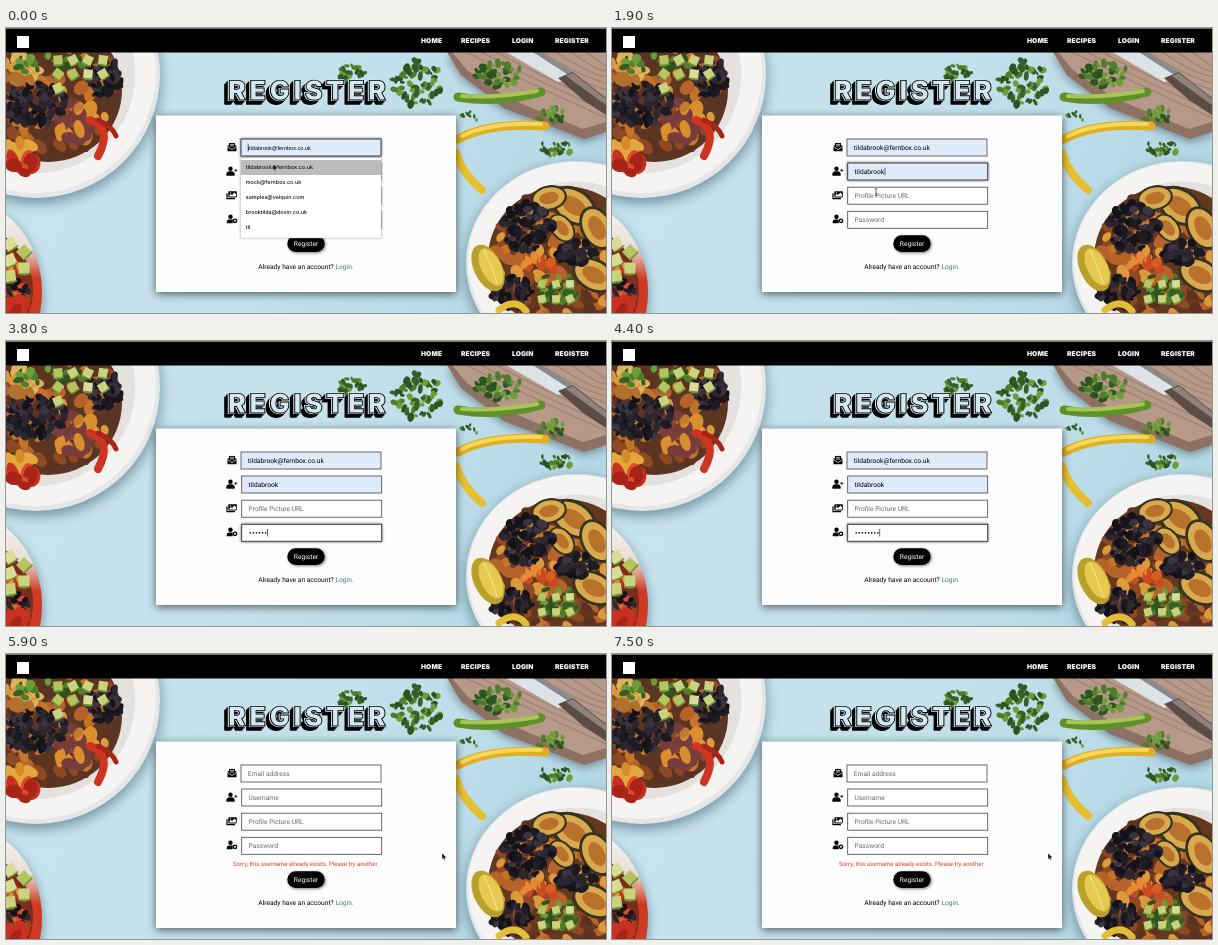
An HTML page with a canvas for the animation above (7600 ms loop, 600 px wide and 285 px high).

```html
<!DOCTYPE html>
<html lang="en">
<head>
<meta charset="utf-8">
<title>Register</title>
<style>
  html, body { margin: 0; width: 100%; height: 100%; overflow: hidden; background: #c4e0ea; }
  canvas, svg { position: absolute; left: 0; top: 0; width: 600px; height: 285px; }
  text { font: 6.67px Roboto, sans-serif; text-rendering: geometricPrecision; white-space: pre; }
  .nav text { font: 900 6.7px Inter, sans-serif; fill: #fff; letter-spacing: .1px; }
  .title text { font: 900 27px Inter, sans-serif; letter-spacing: 3.5px; stroke-linejoin: miter; }
  .card { fill: #fdfdfd; filter: drop-shadow(0 2px 4px rgba(0,0,0,.6)); }
  .field rect { fill: #fff; stroke: #444; stroke-width: .8; }
  .field text { fill: #6a6a6a; }
  .filled rect { fill: #e0ebfa; }
  .typed text { fill: #000; }
  .focus rect { stroke: #333; stroke-width: .9; filter: drop-shadow(0 .4px 1.5px rgba(0,0,0,.6)); }
  .preview text { font: 5.56px "Liberation Sans", Arial, sans-serif; }
  .panel { fill: #fff; stroke: #ccc; stroke-width: .4; filter: drop-shadow(0 .8px 1px rgba(0,0,0,.3)); }
  .list text { font: 500 5.42px Inter, sans-serif; fill: #111; }
  .pill { fill: #000; filter: drop-shadow(1px 1.5px 1.5px rgba(0,0,0,.5)); }
  .error { font-size: 6.04px; fill: #d8431c; }
</style>
</head>
<body>
<canvas id="photo" width="600" height="285"></canvas>
<svg id="ui" viewBox="0 0 600 285">
  <rect width="600" height="24.5"/>
  <rect width="600" height="1" fill="#777"/>
  <rect x="11" y="8" width="12" height="12" fill="#fff"/>
  <g class="nav">
    <text x="415" y="15">HOME</text>
    <text x="455" y="15">RECIPES</text>
    <text x="506" y="15">LOGIN</text>
    <text x="549" y="15">REGISTER</text>
  </g>
  <g class="title" id="title"></g>
  <rect class="card" id="card" x="150" y="87.5" width="300" height="176.5"/>
  <g id="icons">
    <path d="M221.5 118l4.5-3.6 4.5 3.6v5.2h-9zM223 115h6v2l-3 2-3-2z"/>
    <path d="M224 116.4h4M224 118h4M221.5 118.6l4.5 3 4.5-3" fill="none" stroke="#fff" stroke-width=".7"/>
    <circle cx="224.5" cy="140.8" r="2.2"/>
    <path d="M220.7 147.3v-1.2q0-2.4 2.4-2.4h2.8q2.4 0 2.4 2.4v1.2zM228.3 142.4h3M229.8 140.9v3" stroke="#000" stroke-width=".8"/>
    <path d="M221 165.3v5.4h8" fill="none" stroke="#000" stroke-width="1.2"/>
    <rect x="222.3" y="163.2" width="8.5" height="6.2" rx=".8"/>
    <path d="M223.3 168.5v-1l1.6-1.6 1.2 1.1 2.3-2.4 1.6 1.6v2.3z" fill="#fff"/>
    <circle cx="224.5" cy="164.9" r=".7" fill="#fff"/>
    <circle cx="224.5" cy="188.8" r="2.2"/>
    <path d="M220.7 195.2v-1.2q0-2.4 2.4-2.4h3.6v3.6z"/>
    <circle cx="229" cy="192.8" r="1.7" fill="#fff" stroke="#000" stroke-width="1.4"/>
  </g>
  <g id="fields"></g>
  <text class="error" id="error" x="227" y="211.6">Sorry, this username already exists. Please try another</text>
  <g id="foot">
    <rect class="pill" x="281.3" y="207.3" width="37.4" height="16.6" rx="8.3"/>
    <text x="287.8" y="217.5" fill="#fff">Register</text>
    <text x="252.3" y="241">Already have an account? <tspan fill="#3c7d74">Login.</tspan></text>
  </g>
  <g id="dots"></g>
  <rect id="caret" width=".6" height="7.6"/>
  <g class="list" id="emails"></g>
  <g class="list" id="users"></g>
  <path id="arrow" d="M0 0v6.6l1.5-1.4 1 2.4 1.1-.5-1-2.3h2.1z" stroke="#fff" stroke-width=".5"/>
  <path id="beam" d="M-1.3-3.4q1.3 0 1.3.8 0-.8 1.3-.8M0-2.6v5.2M-1.3 3.4q1.3 0 1.3-.8 0 .8 1.3.8" fill="none" stroke="#222" stroke-width=".7"/>
</svg>
<script>
const LOOP = 7600;
const USER = "tildabrook", EMAIL = USER + "@fernbox.co.uk";
const $ = id => document.getElementById(id);

function add(parent, tag, attrs, text) {
  const el = document.createElementNS($("ui").namespaceURI, tag);
  for (const key in attrs) el.setAttribute(key, attrs[key]);
  if (text) el.textContent = text;
  parent.appendChild(el);
  return el;
}
const show = (el, on) => el.style.display = on ? "" : "none";

// ---- background ----
const ctx = $("photo").getContext("2d");
let seed = 11;
const rnd = () => (seed = seed * 16807 % 2147483647) / 2147483647;
const pick = list => list[Math.floor(rnd() * list.length)];

function oval(x, y, rx, ry, color, turn = 0) {
  ctx.fillStyle = color;
  ctx.beginPath();
  ctx.ellipse(x, y, rx, ry, turn, 0, Math.PI * 2);
  ctx.fill();
}
function poly(color, ...pts) {
  ctx.fillStyle = color;
  ctx.beginPath();
  for (let i = 0; i < pts.length; i += 2) ctx.lineTo(pts[i], pts[i + 1]);
  ctx.fill();
}
function curve(color, width, x, y, cx, cy, ex, ey) {
  ctx.strokeStyle = color;
  ctx.lineWidth = width;
  ctx.lineCap = "round";
  ctx.beginPath();
  ctx.moveTo(x, y);
  ctx.quadraticCurveTo(cx, cy, ex, ey);
  ctx.stroke();
}
function scatter(n, x, y, rx, ry, size, colors) {
  for (let i = 0; i < n; i++) {
    const a = rnd() * 6.283, d = Math.sqrt(rnd()), s = size * (.6 + rnd() * .6);
    oval(x + Math.cos(a) * d * rx, y + Math.sin(a) * d * ry, s, s * (.45 + rnd() * .4), pick(colors), rnd() * 3);
  }
}
function shade(color, blur, y) {
  ctx.shadowColor = color;
  ctx.shadowBlur = blur;
  ctx.shadowOffsetY = y;
}
function plate(x, y, rx, ry) {
  shade("rgba(45,85,105,.6)", 14, 5);
  oval(x, y, rx, ry, "#e6e6e6");
  shade("transparent", 0, 0);
  oval(x - 1, y - 2, rx - 3, ry - 3, "#f5f4f3");
  oval(x, y, rx * .8, ry * .8, "#e4e1de");
}
function gradient(x0, y0, x1, y1, ...colors) {
  const g = ctx.createLinearGradient(x0, y0, x1, y1);
  colors.forEach((c, i) => g.addColorStop(i / (colors.length - 1), c));
  return g;
}
function courgette(x, y, r, turn) {
  oval(x, y, r, r * .7, "#33331f", turn);
  oval(x, y, r * .88, r * .58, "#d9a94e", turn);
  oval(x, y, r * .55, r * .33, "#b9722c", turn);
}
function avocado(x, y, r) {
  const a = rnd() * 1.5, c = Math.cos(a) * r, s = Math.sin(a) * r;
  poly(pick(["#c9d27c", "#b3c460", "#dadb95"]), x + c, y + s, x - s, y + c, x - c, y - s, x + s, y - c);
  curve("#6f9434", 1.6, x + c, y + s, x, y + r, x - s, y + c);
}

const WARM = ["#c47428", "#dc9a3c", "#8f4824", "#b5632a", "#5d3020"];
const BEANS = ["#1d1a22", "#2b2630", "#14131a", "#3a3340"];
const GREENS = ["#4f7d2c", "#6f9c3a", "#355f25", "#2d5420"];
const REDS = ["#c8301f", "#dd4a2b", "#a82318"];

function leftDishes() {
  plate(30, 46, 124, 124);
  oval(42, 62, 74, 72, "#5c3422");
  scatter(90, 42, 62, 68, 66, 8, WARM);
  scatter(20, 72, 95, 20, 25, 9, ["#d98f2e", "#c47a2c", "#793c3c"]);
  scatter(95, 28, 75, 32, 22, 5, BEANS);
  scatter(60, 100, 50, 18, 19, 4.6, BEANS);
  scatter(14, 14, 40, 16, 13, 8, ["#e0b45c", "#d79840", "#b0702e"]);
  scatter(20, 40, 36, 38, 10, 5, GREENS);
  for (let i = 0; i < 9; i++) avocado(52 + i % 4 * 15, 32 + Math.floor(i / 4) * 14, 6.5);
  scatter(8, 15, 119, 15, 12, 8, ["#d78c2c", "#e3a83d"]);
  scatter(12, 14, 136, 15, 9, 9, REDS);
  curve("#cf3420", 8, 84, 92, 107, 100, 92, 128);
  curve("#a82318", 5, 92, 92, 107, 99, 110, 108);

  shade("rgba(45,85,105,.6)", 12, 4);
  oval(-48, 264, 84, 94, gradient(0, 190, 0, 250, "#f1efed", "#e9ddd5", "#cf3b22"));
  shade("transparent", 0, 0);
  oval(-36, 262, 63, 64, "#7d2d1c");
  scatter(25, 4, 262, 18, 30, 7, WARM.concat(REDS));
  scatter(16, 9, 262, 14, 12, 4.5, BEANS);
  for (let i = 0; i < 5; i++) avocado(4 + i % 2 * 14, 216 + i * 8, 8);
  scatter(9, 8, 278, 14, 9, 8, REDS);
}

function board() {
  shade("rgba(60,70,80,.55)", 8, 3);
  poly("#8d7263", 441, 24, 600, 24, 600, 104, 578, 111, 498, 80, 455, 47);
  shade("transparent", 0, 0);
  poly("#b7998a", 446, 24, 600, 24, 600, 94, 577, 101, 502, 70, 461, 42);
  for (let i = 0; i < 9; i++) curve("rgba(100,70,55,.3)", 1.2, 460 + i * 15, 24, 510 + i * 13, 49, 600, 90 - i * 7);
  poly("#dce3e7", 500, 24, 527, 24, 568, 50, 552, 54);
  poly("#858a8e", 527, 24, 534, 24, 573, 48, 567, 50);
  poly("#5b4c45", 552, 50, 567, 44, 600, 70, 600, 87, 577, 72);
  poly("#8e827a", 560, 48, 567, 45, 600, 71, 600, 77);
  scatter(45, 493, 47, 24, 13, 4, GREENS);
  scatter(20, 345, 45, 14, 8, 3.5, GREENS);
  scatter(55, 411, 55, 26, 22, 4, GREENS);
  curve("#5f912b", 9, 452, 69, 492, 76, 535, 64);
  curve("#a9c558", 4, 456, 68, 493, 70, 531, 63);
  curve("#dfae22", 9, 452, 111, 484, 94, 539, 98);
  curve("#f5d75a", 4, 456, 108, 484, 94, 535, 96);
  curve("#e6bf32", 8, 450, 125, 456, 145, 476, 162);
  scatter(24, 545, 88, 15, 8, 3.5, GREENS);
  scatter(22, 551, 119, 17, 8, 3.2, GREENS);
  scatter(8, 462, 90, 9, 8, 2.5, GREENS);
}

function rightDish() {
  plate(570, 235, 110, 102);
  oval(558, 230, 76, 72, "#64371f");
  scatter(110, 554, 230, 67, 64, 8, WARM);
  courgette(568, 178, 25, .6);
  courgette(591, 200, 23, 1.1);
  courgette(543, 170, 18, -.2);
  courgette(588, 247, 23, .5);
  courgette(556, 200, 16, .9);
  scatter(85, 522, 200, 25, 24, 5, BEANS);
  scatter(50, 506, 265, 20, 17, 5, BEANS);
  scatter(35, 570, 224, 21, 12, 5, BEANS);
  scatter(30, 552, 260, 20, 18, 5, GREENS);
  for (let i = 0; i < 6; i++) avocado(536 + i % 3 * 14, 256 + Math.floor(i / 3) * 15, 5.5);
  scatter(14, 530, 236, 17, 10, 6, ["#d95c22", "#e78a35", "#c94b22"]);
  oval(482, 240, 14, 25, "#b8a02a", -.45);
  oval(485, 239, 10, 20, "#e6c94f", -.45);
  curve("#f0e7a0", 1, 478, 222, 486, 238, 491, 255);
  curve("#e3bd38", 7, 493, 282, 509, 269, 520, 283);
}

function paintPhoto() {
  ctx.fillStyle = gradient(0, 20, 600, 285, "#c9e4ee", "#c3e0eb", "#b0d6e4");
  ctx.fillRect(0, 0, 600, 285);
  leftDishes();
  board();
  rightDish();
}

// ---- form ----
const FIELDS = [
  { x: 235, y: 111, hint: "Email address" },
  { x: 235.7, y: 135, hint: "Username" },
  { x: 235.7, y: 159.2, hint: "Profile Picture URL" },
  { x: 235.7, y: 183.3, hint: "Password" }
];
for (const f of FIELDS) {
  f.box = add($("fields"), "g", {});
  add(f.box, "rect", { x: f.x, y: f.y, width: 140, height: 17 });
  f.label = add(f.box, "text", { x: f.x + 6.8, y: f.y + 10.5 });
}

function makeList(id, x, y, top, items) {
  const rows = items.length * 15;
  add($(id), "rect", { class: "panel", x, y, width: 140.4, height: top - y + rows + 3 });
  return items.map((item, i) => {
    const bar = add($(id), "rect", { x, y: top + i * 15, width: 140.4, height: 15, fill: "#bcbcbc" });
    add($(id), "text", { x: x + 5, y: top + i * 15 + 9.1 }, item);
    return { bar, y: top + i * 15 };
  });
}
const emailRows = makeList("emails", 234.8, 130, 132, [
  EMAIL, "mock@fernbox.co.uk", "samples@velquin.com", "brooktilda@dovin.co.uk", "til"]);
const userRows = makeList("users", 235.8, 153.5, 156, [
  USER, "chief", USER + "k", USER + "123", USER + "test", "Chief"]);

const dots = Array.from({ length: 8 }, (_, i) =>
  add($("dots"), "circle", { cx: 244.2 + i * 3.1, cy: 191.9, r: .8 }));

// hollow letters over a block shadow, separated by a thin gap
function titleLayer(shift, fill, stroke, width) {
  add($("title"), "text", {
    x: 222 - shift, y: 71.7 + shift, fill, stroke, "stroke-width": width
  }, "REGISTER");
}
const FACE = "#d3e8f0";
for (let i = 4.4; i > 1; i -= .6) titleLayer(i, "#000", "#000", 1);
titleLayer(.5, FACE, FACE, 2);
titleLayer(0, FACE, "#000", .9);

// ---- motion ----
const PATH = [[0, 267, 136], [500, 267, 136], [800, 265, 145], [1100, 264, 154], [1350, 264, 160],
  [1900, 264, 164], [2350, 264, 190], [2700, 264, 190]];

function pointer(t) {
  if (t >= 5000) return [436, 199];
  const i = PATH.findIndex(p => p[0] > t);
  if (i < 0) return null;
  const [a, b] = [PATH[i - 1], PATH[i]];
  const u = (t - a[0]) / (b[0] - a[0]), e = u * u * (3 - 2 * u);
  return [a[1] + (b[1] - a[1]) * e, a[2] + (b[2] - a[2]) * e];
}

function setField(i, value, focus, style = "") {
  const f = FIELDS[i];
  f.box.setAttribute("class", `field ${value ? "typed" : ""} ${focus ? "focus" : ""} ${style}`);
  const text = value || f.hint;
  if (f.label.textContent !== text) f.label.textContent = text;
}

function draw(t) {
  const failed = t >= 5000;
  const preview = t < 550;
  const pickUser = t >= 850 && t < 1500;
  const focus = failed ? -1 : t < 850 ? 0 : t < 2400 ? 1 : 3;
  const named = t >= 1500 && !failed;
  const count = failed ? 0 : Math.max(0, Math.min(8, Math.floor((t - 2700) / 180)));

  setField(0, failed ? "" : EMAIL, focus === 0, failed ? "" : preview ? "filled preview" : "filled");
  setField(1, named ? USER : "", focus === 1, named ? "filled" : "");
  setField(2, "", false);
  setField(3, count ? " " : "", focus === 3);
  dots.forEach((d, i) => show(d, i < count));

  show($("error"), failed);
  $("card").setAttribute("height", failed ? 186.5 : 176.5);
  $("foot").setAttribute("transform", `translate(0 ${failed ? 10 : 0})`);

  const caretX = preview ? 241.8
    : focus === 0 ? 242.2 + FIELDS[0].label.getComputedTextLength()
    : named && focus === 1 ? 243 + FIELDS[1].label.getComputedTextLength()
    : 242.7 + count * 3.1;
  show($("caret"), focus >= 0 && !pickUser);
  $("caret").setAttribute("x", caretX);
  $("caret").setAttribute("y", FIELDS[Math.max(focus, 0)].y + 4.6);

  show($("emails"), preview);
  show($("users"), pickUser);
  const p = pointer(t);
  for (const row of emailRows.concat(userRows)) show(row.bar, p && p[1] >= row.y && p[1] < row.y + 15);

  const overField = p && !preview && !pickUser && !failed &&
    FIELDS.some(f => p[1] > f.y && p[1] < f.y + 17);
  show($("arrow"), p && !overField);
  show($("beam"), overField);
  if (p) for (const id of ["arrow", "beam"]) $(id).setAttribute("transform", `translate(${p})`);
}

paintPhoto();
const start = performance.now();
function tick() {
  draw((performance.now() - start) % LOOP);
  requestAnimationFrame(tick);
}
tick();
</script>
</body>
</html>
```
